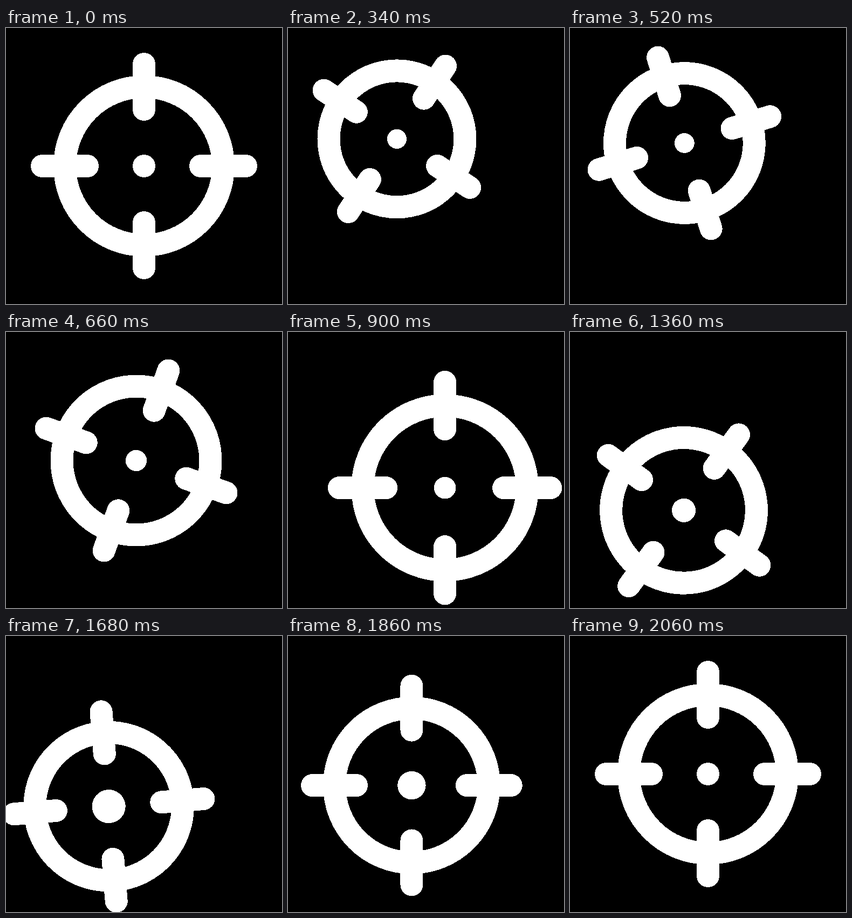
An HTML page that plays this animation: 512 px wide and 512 px high, repeating every 4820 ms.

```html
<!DOCTYPE html>
<html lang="en">
<head>
<meta charset="utf-8">
<title>Crosshair</title>
<style>
  html, body { margin: 0; width: 100%; height: 100%; overflow: hidden; background: #000; }
  svg { display: block; width: 100%; height: 100%; shape-rendering: crispEdges; }
  .lines { fill: none; stroke: #fff; stroke-width: 42; stroke-linecap: round; }
</style>
</head>
<body>
<svg viewBox="0 0 512 512">
  <g id="sight">
    <circle id="ring" class="lines"/>
    <path id="bars" class="lines"/>
    <circle id="dot" fill="#fff"/>
  </g>
</svg>
<script>
const LOOP = 4820, STEP = 20, END = 2060;
const CENTER = 256, UNIT = 21;

const [sight, ring, bars, dot] =
  ['sight', 'ring', 'bars', 'dot'].map(id => document.getElementById(id));

const bow = u => u * (1 - u);

// Eased progress from 0 to 1 between two times.
function progress(t, from, to) {
  const u = Math.min(1, Math.max(0, (t - from) / (to - from)));
  return u * u * (3 - 2 * u);
}

function poseAt(t) {
  const during = (from, to) => progress(t, from, to);

  // The sight drifts up left, down right, down left, then home on bowed paths.
  const away = during(0, 383);
  const across = during(383, 1000);
  const sweep = during(1000, 1550);
  const home = during(1550, END);

  return {
    x: CENTER - 56 * away + 98 * across - 120 * sweep + 78 * home,
    y: CENTER - 52 * away + 93 * across + 34 * sweep - 75 * home
      - 20 * bow(across) + 46 * bow(sweep) - 20 * bow(home),
    scale: 1 - 0.145 * away + 0.197 * across
      - 0.15 * during(1000, 1450) + 0.098 * during(1450, END),
    turn: 360 * during(0, 1800),
    pulse: 1 - 0.15 * during(680, 1150)
      + 0.75 * during(1150, 1640) - 0.6 * during(1640, END)
  };
}

function draw(t) {
  const { x, y, scale, turn, pulse } = poseAt(t);
  const unit = UNIT * scale;

  sight.setAttribute('transform', `translate(${x} ${y}) rotate(${turn})`);
  ring.setAttribute('r', 7 * unit);
  dot.setAttribute('r', unit * pulse);
  bars.setAttribute('d', [-unit, unit].map(side => {
    const near = 5 * side, far = 9 * side;
    return `M0 ${near}V${far}M${near} 0H${far}`;
  }).join(''));
}

const start = performance.now();

function tick() {
  const t = (performance.now() - start) % LOOP;
  draw(Math.floor(t / STEP) * STEP);
  requestAnimationFrame(tick);
}

tick();
</script>
</body>
</html>
```
